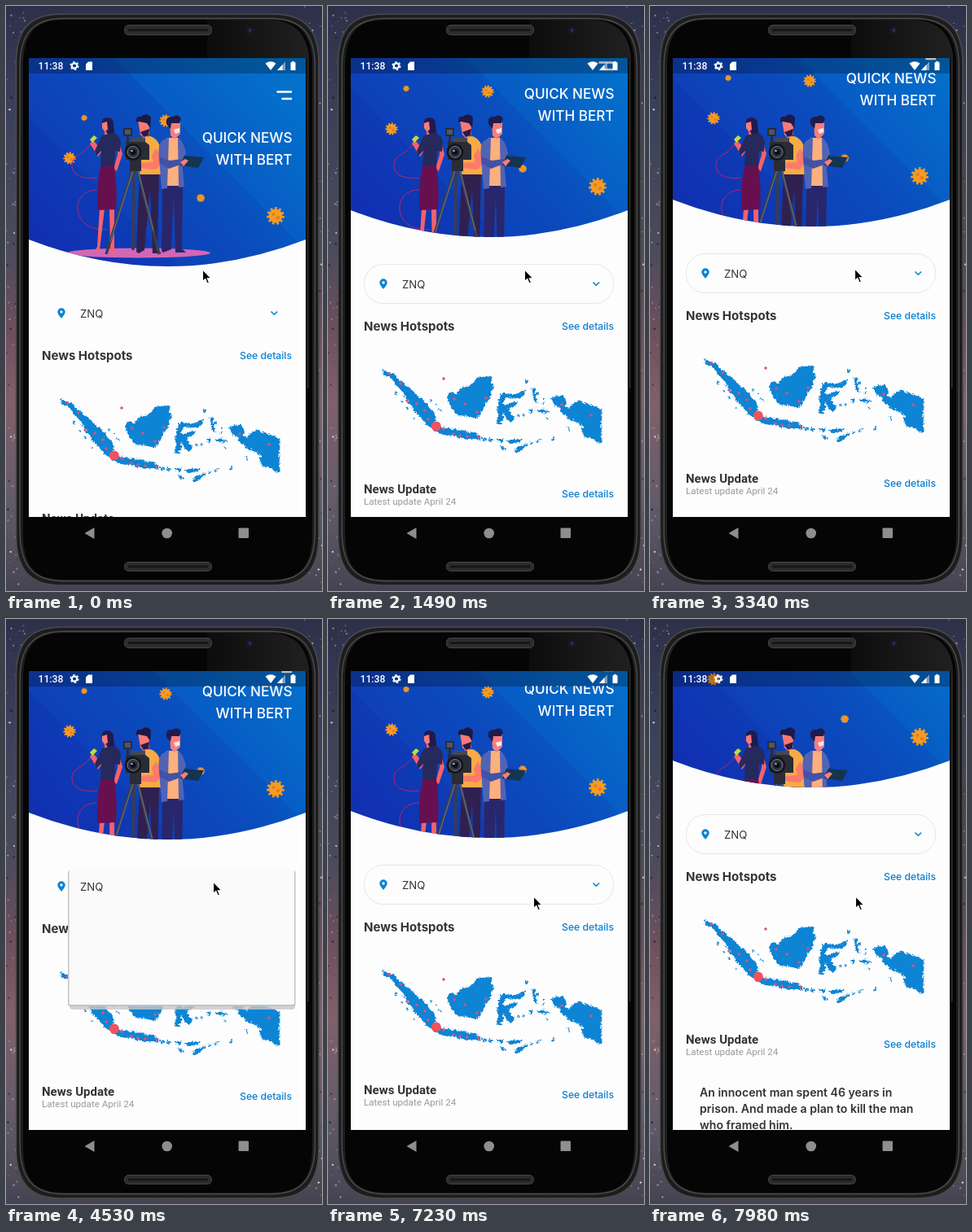
These frames come from a looping animation (388 px wide and 719 px high, 8 s). An HTML page:

```html
<!DOCTYPE html>
<html lang="en">
<head>
<meta charset="utf-8">
<title>Quick news</title>
<style>
html, body { margin: 0; height: 100%; overflow: hidden; background: #33334a; }
svg { display: block; width: 388px; height: 719px; }
text { font-family: Inter, "Open Sans", sans-serif; fill: #333; }
.roboto { font-family: Roboto, Arial, sans-serif; }
.title { font-size: 17.1px; font-weight: 500; fill: #fff; text-anchor: end; }
.head { font-size: 15px; font-weight: 700; }
.link { font-size: 12.2px; font-weight: 500; fill: #0a7fd2; text-anchor: end; }
.item { font-size: 13.2px; }
.story { font-size: 14.1px; font-weight: 600; }
</style>
</head>
<body>
<svg viewBox="0 0 388 719">
<defs>
  <linearGradient id="sky" x2="0" y2="1">
    <stop stop-color="#2d3049"/><stop offset=".2" stop-color="#3b4259"/>
    <stop offset=".42" stop-color="#4d4b5c"/><stop offset=".56" stop-color="#6f505d"/>
    <stop offset=".68" stop-color="#80606b"/><stop offset=".85" stop-color="#635b69"/>
    <stop offset="1" stop-color="#454352"/>
  </linearGradient>
  <linearGradient id="blue" gradientUnits="userSpaceOnUse" x1="60" y1="310" x2="330" y2="80">
    <stop stop-color="#1130b2"/><stop offset=".5" stop-color="#0a45b8"/><stop offset="1" stop-color="#026ac6"/>
  </linearGradient>
  <linearGradient id="gloss" x2="1" y2="0">
    <stop stop-color="#fff" stop-opacity=".03"/><stop offset="1" stop-color="#fff" stop-opacity=".11"/>
  </linearGradient>
  <filter id="coast" x="-5%" y="-5%" width="110%" height="110%">
    <feTurbulence baseFrequency=".22" numOctaves="2" seed="4"/>
    <feDisplacementMap in="SourceGraphic" scale="5" xChannelSelector="R" yChannelSelector="G"/>
  </filter>
  <clipPath id="screen"><path d="M28 64H368V628H28Z"/></clipPath>
  <clipPath id="below"><path d="M28 82H368V628H28Z"/></clipPath>
  <clipPath id="dome"><path id="domeEdge" d="M28 -60H368V287Q198 353 28 287Z"/></clipPath>
</defs>

<rect width="388" height="719" fill="url(#sky)"/>
<g id="stars"></g>

<!-- phone -->
<path id="body" d="M12.500 70C12.500 28 30 10 68 10H328C366 10 384 28 384 70V650C384 694 366 712 328 712H68C30 712 12.500 694 12.500 650Z"
  fill="#1d1d1e" stroke="#4b4b4d" stroke-width="1.500"/>
<use href="#body" transform="translate(198 361) scale(.975 .985) translate(-198 -361)"/>
<path d="M21 74C21 34 36 17 70 17H326C360 17 376 34 376 74V648C376 690 360 705 326 705H70C36 705 21 690 21 648Z" fill="#050505"/>
<path d="M247 17H326Q366 19 372 60V470H369V64H247Z" fill="url(#gloss)"/>
<g fill="#2c2c2d" stroke="#454546">
  <rect x="145.500" y="23.500" width="107" height="12" rx="5"/>
  <rect x="145.500" y="683.500" width="107" height="11" rx="5"/>
</g>
<path d="M150 29.500H248M150 689H248" stroke="#171718" stroke-width="3"/>
<circle cx="299.500" cy="30" r="5" fill="#17172a"/><circle cx="299.500" cy="30" r="2" fill="#2e2c55"/>
<g fill="#8e8e8e">
  <path d="M96.500 648L108.500 641V655Z"/><circle cx="197.700" cy="648" r="6.300"/>
  <rect x="285.500" y="641.500" width="12.500" height="12.500" rx="1"/>
</g>

<g clip-path="url(#screen)">
  <path d="M28 64H368V628H28Z" fill="#fdfdfd"/>

  <g clip-path="url(#dome)">
    <g class="scroll">
      <path d="M28 64H368V330H28Z" fill="url(#blue)"/>
      <path d="M28 138L214 324H368V64H28Z" fill="#1f7be0" opacity=".08"/>
      <path d="M132 64L368 300V64Z" fill="#008cdc" opacity=".15"/>
      <g id="germs"></g>
    </g>

    <!-- news crew -->
    <ellipse cx="163" cy="303.500" rx="88" ry="6" fill="#d267b4"/>
    <path d="M106 166C96 185 82 181 81 195S96 213 112 211M112 226C92 226 85 242 89 255S104 275 124 275"
      fill="none" stroke="#b92568" stroke-width="1"/>
    <g fill="#f9606a">
      <path d="M115 249H121L115 300L107 303L112 296ZM127 249H133V299L137 303H128Z"/>
      <path d="M121 148H128V160H121Z"/>
      <path d="M138 164L143 182L136 203L132 200L137 183Z"/>
      <path d="M113 185L103 169L107 165L118 178Z"/>
    </g>
    <path d="M118 144Q117 137 125 137Q133 138 132 147L134 161L126 160L120 148Z" fill="#211b4c"/>
    <path d="M118 144L124 142L125 152L121 154L118 150Z" fill="#fb7b78"/>
    <path d="M118 159L132 156Q139 158 141 167L140 179L134 178L133 198H116L117 178L111 184L109 178Z" fill="#26295c"/>
    <path d="M116 197H133Q137 224 135 250L112 251Q111 221 116 197Z" fill="#68104f"/>
    <path d="M103 164L108 159L112 162L106 168Z" fill="#bfe02e"/>

    <path d="M164 205H188L186 299L191 304H180L177 225L170 300L163 304L160 302Z" fill="#30204f"/>
    <path d="M163 167Q166 160 177 160Q188 163 191 180L190 207H164Z" fill="#f7aa45"/>
    <path d="M184 175L193 190L184 201L162 199L161 193L181 192L179 184Z" fill="#fb7a6b"/>
    <path d="M162 140L176 138L176 158L170 163L165 158Z" fill="#fb7974"/>
    <path d="M160 143Q159 134 166 136Q172 130 178 137L177 150L173 144L163 142Z" fill="#1d1945"/>
    <path d="M165 155L176 151L175 159L169 161Z" fill="#261a49"/>

    <path d="M192 218H217L216 298L221 303H208L206 232L203 299L193 303L191 301Z" fill="#29266c"/>
    <path d="M197 162H212L216 221H194Z" fill="#fbb07d"/>
    <path d="M200 161L191 166Q186 172 188 187L191 225L198 224Z" fill="#5263b5"/>
    <path d="M211 162Q218 165 221 181L216 190L219 222L212 223Z" fill="#5263b5"/>
    <path d="M201 143L214 140V157L207 164L202 159Z" fill="#fb7d79"/>
    <path d="M197 145Q195 135 205 136Q212 132 215 139L213 144L203 144L202 151Z" fill="#211b4c"/>
    <path d="M206 152L213 150V155L208 157Z" fill="#f9e9ec"/>
    <path d="M188 185L201 190L216 188L219 193L200 200L189 194Z" fill="#4252a4"/>
    <path d="M219 184L243 186L236 199L214 196Z" fill="#143550"/>
    <path d="M214 192L220 188L224 190L218 197Z" fill="#fb7d79"/>

    <!-- camera and tripod -->
    <path d="M157 196L123 305M157 196L156 300M160 196L188 305" stroke="#3a3d4c" stroke-width="3.500"/>
    <path d="M156 202L128 290M162 202L181 276" stroke="#686c7c" stroke-width="1.200"/>
    <path d="M152 188H166V203H152Z" fill="#2a2c38"/>
    <path d="M144 150H155V160H144ZM148 160H151V167H148ZM147 167H171L176 171V189H147Z" fill="#2a2c35"/>
    <path d="M154 162H171V167H154Z" fill="#464852"/>
    <path d="M146 152H153V158H146Z" fill="#515663"/>
    <circle cx="156" cy="179.500" r="10.500" fill="#15171e"/>
    <circle cx="156" cy="179.500" r="7" fill="#2b303d" stroke="#777f8e"/>
    <circle cx="156" cy="179.500" r="3.500" fill="#0b0d14"/><circle cx="154.500" cy="178" r="1.300" fill="#a6b0c4"/>
  </g>

  <g clip-path="url(#below)"><g id="title">
    <text class="title" x="351.500" y="168">QUICK NEWS</text>
    <text class="title" x="351.500" y="195">WITH BERT</text>
  </g></g>

  <g class="scroll">
    <path d="M333.500 105.500H350M339.500 114H350" stroke="#fff" stroke-width="2.600" stroke-linecap="round"/>
    <rect id="border" x="44.500" y="353.500" width="306" height="48" rx="23" fill="none" stroke="#e6e6e6"/>
    <path d="M68 384Q63.300 378.500 63.300 376A4.700 4.700 0 0 1 72.700 376Q72.700 378.500 68 384Z" fill="#0a82d2"/>
    <circle cx="68" cy="376" r="1.700" fill="#fff"/>
    <text class="item" x="91" y="382.500">ZNQ</text>
    <path d="M325.500 375.500L329.300 379.200L333.100 375.500" fill="none" stroke="#0a82d2" stroke-width="1.600"/>

    <text class="head" x="44" y="435">News Hotspots</text>
    <text class="link" x="351" y="434">See details</text>

    <g filter="url(#coast)" fill="#0b84d4" stroke="#0b84d4" stroke-width="1" stroke-linejoin="round">
      <path d="M66 482L72 485L80 487L84 493L92 498L98 505L106 511L110 516L114 519L120 524L121 529L128 534L131 540L130 549L125 552L120 549L113 541L106 533L100 524L95 516L88 507L82 498L75 491L67 487Z"/>
      <path d="M128 552L135 551L142 554L150 555L157 556L164 556L170 559L178 560L184 563L186 567L178 567L168 566L158 564L148 562L138 560L130 557Z"/>
      <path d="M146 513L150 509L156 512L162 505L168 503L174 501L180 495L185 490L190 492L193 490L200 491L198 497L202 503L198 508L199 514L194 520L190 527L186 534L182 541L174 540L168 537L160 538L154 534L150 527L147 520Z"/>
      <path d="M209 518L212 512L218 511L226 513L234 510L241 507L240 512L234 516L224 516L216 516L214 522L216 526L222 523L231 521L228 525L221 529L222 535L227 540L224 546L219 543L216 535L213 534L214 541L211 549L206 547L208 538L206 531L209 524Z"/>
      <path d="M250 504L253 506L252 512L257 511L254 515L256 523L252 520Z"/>
      <path d="M256 532L262 530L270 534L264 535ZM244 532L250 531L249 535Z"/>
      <path d="M273 517L280 514L288 516L291 522L288 527L295 530L300 523L308 520L316 524L325 527L334 530V572L328 569L322 565L314 564L310 557L313 551L303 545L296 543L291 537L286 534L283 527L277 526Z"/>
      <path d="M188 565L193 567L190 569ZM196 566L202 568L198 570ZM205 567L214 568L210 571ZM219 569L230 568L238 567L234 570L224 572ZM209 575L217 578L213 580ZM228 581L235 576L244 573L238 579L230 583Z"/>
      <path d="M81 510L84 513M88 519L90 522M95 529L96 531M104 541L105 543M133 530L138 532M124 519L126 520M262 517L265 517M238 536L239 540M232 537L233 541M294 552L295 557M274 568L276 565M254 570L260 568M247 572L250 571M266 541L268 543M262 523L264 524M244 494L243 498M131 525H133" stroke-width="2"/>
    </g>
    <g id="spots"></g>
    <circle cx="132.800" cy="552.500" r="6" fill="#f0525f"/>

    <text class="head roboto" x="44" y="635">News Update</text>
    <text class="roboto" x="44" y="649" font-size="11.600" style="fill:#999">Latest update April 24</text>
    <text class="link" x="351" y="640">See details</text>
    <text class="story" x="61" y="700">An innocent man spent 46 years in</text>
    <text class="story" x="61" y="720">prison. And made a plan to kill the man</text>
    <text class="story" x="61" y="740">who framed him.</text>
  </g>

  <g id="menu">
    <rect x="78" y="313" width="277" height="167" rx="4" fill="#c9c9c9" opacity=".8"/>
    <rect x="76" y="309" width="279.500" height="167" rx="3" fill="#c4c4c4"/>
    <rect x="77.500" y="308.500" width="276.500" height="165.500" rx="2" fill="#fafafa"/>
    <path id="row" d="M77.500 309H354V348.500H77.500Z" fill="#ebebeb"/>
    <circle id="ripple" cx="256.500" cy="325" fill="#d8d8d8"/>
    <text class="item" x="91" y="333.500">ZNQ</text>
    <g id="items">
      <text class="item" x="91" y="373">The Hallmere</text>
      <text class="item" x="91" y="413">West Orrin Post</text>
      <text class="item" x="91" y="452.500">Vole News</text>
    </g>
  </g>

  <!-- status bar -->
  <path d="M28 64H368V83H28Z" opacity=".25"/>
  <text class="roboto" x="39.500" y="78" font-size="12.200" font-weight="500" style="fill:#fff">11:38</text>
  <g fill="#fff">
    <circle cx="84" cy="73.500" r="3.200" fill="none" stroke="#fff" stroke-width="2.200"/>
    <circle cx="84" cy="73.500" r="4.900" fill="none" stroke="#fff" stroke-width="1.300" stroke-dasharray="2.565"/>
    <path d="M101 68.500H106V79H98V71.500Z"/>
    <path d="M318.500 70.500Q325 66 331.500 70.500L325 79Z"/>
    <path d="M343 68.500V79H333Z" opacity=".45"/><path d="M339.500 72V79H333Z"/>
    <path d="M351 68H354V69.300H355.500V79H349.500V69.300H351Z"/>
  </g>
</g>

<path id="cursor" d="M0 0V14.500L3.300 11.500L5.600 17L8 16L5.700 10.700H10.200Z" stroke="#fff" stroke-width="1.100"/>
</svg>

<script>
const $ = id => document.getElementById(id);
const LOOP = 8000;

// Each list holds [start time, value...]
const scrolls = [[0, 0], [450, 4], [590, 8], [1190, 13], [1340, 25], [1490, 36], [1640, 45], [1790, 49],
  [7230, 51], [7380, 59], [7530, 72], [7680, 87], [7830, 101], [7980, 113]];
const pointer = [[0, 241.5, 324], [3340, 251.5, 323], [3490, 253, 323], [3640, 254, 323], [3790, 254.5, 323],
  [6490, 254, 328], [6640, 253, 336], [6790, 252.5, 341]];
const ripples = [[0, 0], [5750, 6], [5900, 12], [6050, 17]];
const at = (list, t) => list.filter(step => step[0] <= t).pop().slice(1);

let seed = 7;
const rand = () => (seed = seed * 16807 % 2147483647) / 2147483647;

const colors = ["#fff", "#a9a6c9", "#c48f94", "#5c5b8f", "#17142b"];
let stars = "";
for (let i = 0; i < 320; i++) {
  const x = rand() * 50 - 25;
  stars += `<circle cx="${x < 0 ? 388 + x : x}" cy="${rand() * 719}" r="${.3 + rand() * 1.1}"
    fill="${colors[i % 5]}" opacity="${.3 + rand() * .5}"/>`;
}
$("stars").innerHTML = stars;

$("germs").innerHTML = [[96, 137.5, 3], [78, 187, 6], [196, 141, 6], [239, 236, 4], [331, 258, 8.5]]
  .map(([x, y, r]) => `<g transform="translate(${x} ${y})">
    <circle r="${r}" fill="#f79a23"/>
    <circle r="${r * 1.08}" fill="none" stroke="#f79a23" stroke-width="${r * .4}" stroke-dasharray="${r * 1.08 * Math.PI / 11}"/>
    <circle cx="${-r * .3}" cy="${-r * .25}" r="${r * .22}" fill="#e17d17"/>
    <circle cx="${r * .35}" cy="${r * .25}" r="${r * .25}" fill="#e17d17"/></g>`).join("");

$("spots").innerHTML = [[75, 488], [89, 500], [97, 521], [109, 525], [119, 533], [123, 544], [142, 494], [155, 519],
  [168, 525], [194, 518], [183, 535], [287, 526], [323, 539], [142, 556], [154, 562], [162, 564], [171, 565], [185, 566]]
  .map(([x, y]) => `<circle cx="${x}" cy="${y}" r="1.8" fill="#dc5378"/>`).join("");

const show = (id, on) => $(id).setAttribute("visibility", on ? "visible" : "hidden");
const move = (el, x, y) => el.setAttribute("transform", `translate(${x} ${y})`);

function draw() {
  const t = performance.now() % LOOP;
  const [s] = at(scrolls, t);
  const open = t >= 4530 && t < 6200;
  document.querySelectorAll(".scroll").forEach(g => move(g, 0, -s));
  move($("domeEdge"), 0, -s);
  move($("title"), 0, -1.5 * s);
  move($("cursor"), ...at(pointer, t));
  show("border", t >= 450 && !open);
  show("menu", open);
  show("items", open && t >= 4680);
  show("row", open && t >= 5750);
  $("ripple").setAttribute("r", open ? at(ripples, t)[0] : 0);
  requestAnimationFrame(draw);
}
draw();
</script>
</body>
</html>
```
